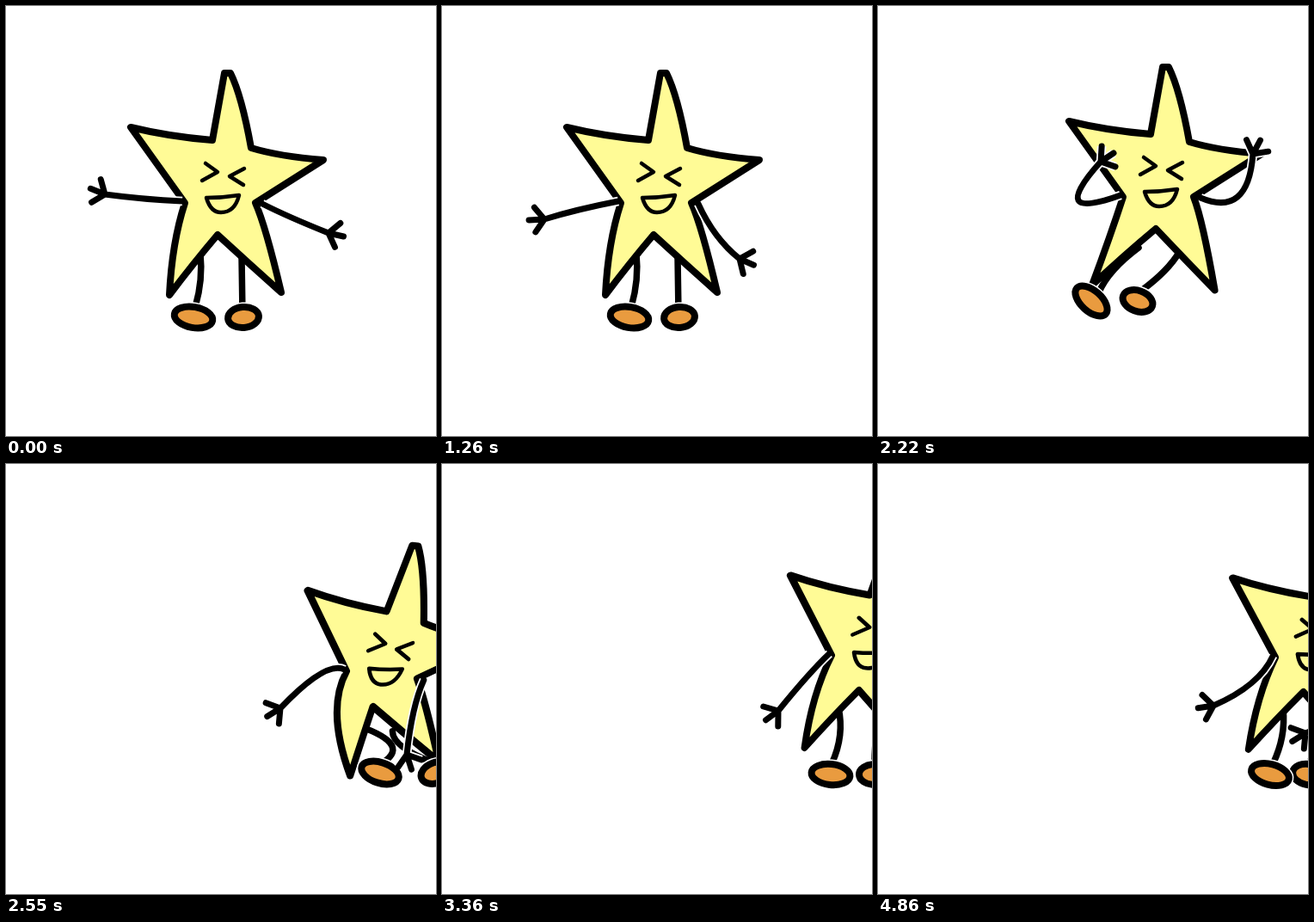
Write an HTML page with a canvas that moves like this. It is 500x500 px and loops after 4.89 s.

```html
<!DOCTYPE html>
<html>
<head>
<meta charset="utf-8">
<style>
html, body { margin: 0; overflow: hidden; background: #fff; }
canvas { display: block; }
</style>
</head>
<body>
<canvas id="stage" width="500" height="500"></canvas>
<script>
const ctx = document.getElementById('stage').getContext('2d');
const LOOP = 4890, STEP = 30;
const YELLOW = '#fffb96', ORANGE = '#e99b3f';
const easeIn = p => u => u ** p;
const easeOut = p => u => 1 - (1 - u) ** p;

// body: x, y, lean, stretch of the lower left tip
// left, right: elbow and wrist, relative to the body
// feet: left x and angle, right x and angle, shared y
// ease and hop describe the way to the next pose
const stand = {
  time: 0, ease: easeIn(8), hop: 0,
  body: [0, 0, 0, 0],
  left: [160, 224, 115, 219],
  right: [332, 246, 375, 264],
  feet: [218, 10, 276, -5, 362]
};
const drop = { ...stand, time: 1260, ease: easeIn(3),
  left: [159, 237, 119, 248], right: [319, 266, 346, 294] };
const crouch = {
  time: 1770, ease: easeIn(3), hop: 8,
  body: [-12, 8, -.05, 25],
  left: [180, 186, 165, 228],
  right: [337, 214, 325, 252],
  feet: [217, 38, 279, -12, 361]
};
const leap = {
  time: 2220, ease: easeIn(1), hop: -32,
  body: [77, -7, 0, -18],
  left: [156, 233, 182, 188],
  right: [341, 229, 359, 179],
  feet: [248, 42, 302, 20, 343]
};
const land = {
  time: 2550, ease: easeOut(3), hop: 0,
  body: [188, 16, -.2, 46],
  left: [176, 229, 131, 268],
  right: [286, 272, 278, 322],
  feet: [435, 18, 500, -20, 359]
};
const rest = { ...land, time: 3360, ease: easeIn(1),
  body: [245, -3, -.17, 5], left: [179, 251, 146, 290], feet: [452, 6, 503, 0, 361] };
const end = { ...rest, time: 4860,
  body: [254, -1, -.15, 3], left: [180, 256, 136, 282],
  right: [290, 280, 243, 314], feet: [456, 15, 500, 10, 361] };
const POSES = [stand, drop, crouch, leap, land, rest, end];

function poseAt(t) {
  const i = Math.max(1, POSES.findIndex(p => p.time >= t));
  const from = POSES[i - 1], to = POSES[i];
  const u = (t - from.time) / (to.time - from.time), k = from.ease(u);
  const mix = key => from[key].map((v, n) => v + (to[key][n] - v) * k);
  const hop = from.hop * Math.sin(Math.PI * u);
  const pose = { body: mix('body'), left: mix('left'), right: mix('right'), feet: mix('feet') };
  pose.body[1] += hop;
  pose.feet[4] += hop * .6;
  return pose;
}

function ink(path, width, fill, color = '#000') {
  if (fill) { ctx.fillStyle = fill; ctx.fill(path); }
  ctx.strokeStyle = color;
  ctx.lineWidth = width;
  ctx.stroke(path);
}

// Bent limb whose curve passes through the joint halfway
function limb([sx, sy], jx, jy, ex, ey) {
  const cx = 2 * jx - (sx + ex) / 2, cy = 2 * jy - (sy + ey) / 2;
  const path = new Path2D();
  path.moveTo(sx, sy);
  path.quadraticCurveTo(cx, cy, ex, ey);
  return { path, angle: Math.atan2(ey - cy, ex - cx) };
}

function drawArm(shoulder, [jx, jy, hx, hy], x, y, twist) {
  const wx = hx + x, wy = hy + y;
  const { path, angle } = limb(shoulder, jx + x, jy + y, wx, wy);
  for (const side of [-1, 0, 1]) {
    const a = angle + twist(angle) + side * .92;
    path.moveTo(wx, wy);
    path.lineTo(wx + 18 * Math.cos(a), wy + 18 * Math.sin(a));
  }
  ctx.lineCap = 'butt';
  ink(path, 10.5, null, '#fff');
  ctx.lineCap = 'round';
  ink(path, 7);
}

function drawLeg(hip, x, y, a, bulge) {
  const ax = x + 13 * Math.sin(a), ay = y - 13 * Math.cos(a);
  ink(limb(hip, (hip[0] + ax) / 2 + bulge, (hip[1] + ay) / 2, ax, ay).path, 7.5);
}

function drawFoot(x, y, a, rx) {
  const path = new Path2D();
  path.ellipse(x, y, rx, 12, a, 0, 7);
  ink(path, 11, null, '#fff');
  ink(path, 8, ORANGE);
}

function drawBody(x, y, a, b, s) {
  ctx.save();
  ctx.transform(1, b, a, 1, x - 229 * a, y - 246 * b);
  const star = new Path2D(`M254 78 L261 78 Q274 104 285 165 Q318 175 369 179 L290 229
    Q${302 + s * .08} 256 ${320 + s * .3} ${333 - s * .25}
    Q${283 + s * .15} ${300 - s * .12} 246 266
    Q${218 + s * .5} ${299 + s * .12} ${190 + s} ${336 + s * .25}
    Q193 275 208 229 L145 141 Q190 152 240 156 Z`);
  ink(star, 8, YELLOW);
  ink(new Path2D(`M232 183 L246 193 L228 203 M277 189 L260 198 L276 208
    M233 223 Q252 223 271 220 Q266 240 250 240 Q238 240 233 223 Z`), 4.5);
  ctx.restore();
}

function draw(t) {
  const { body, left, right, feet } = poseAt(t);
  const [x, y, lean, stretch] = body, tilt = -lean / 2;
  const onBody = (px, py) => [px + x + lean * (py - 229), py + y + tilt * (px - 246)];
  const [lx, la, rx, ra, fy] = feet, rad = Math.PI / 180;
  ctx.fillStyle = '#fff';
  ctx.fillRect(0, 0, 500, 500);
  ctx.lineCap = ctx.lineJoin = 'round';
  drawLeg(onBody(226, 288), lx, fy, la * rad, 3 + stretch / 2);
  drawLeg(onBody(274, 292), rx, fy, ra * rad, -stretch / 4);
  drawBody(x, y, lean, tilt, stretch);
  drawFoot(rx, fy, ra * rad, 18);
  drawFoot(lx, fy, la * rad, 22.5);
  drawArm(onBody(205, 227), left, x, y, () => .25);
  drawArm(onBody(298, 230), right, x, y, a => -.42 * Math.sin(a));
}

const start = performance.now();
function tick() {
  const t = (performance.now() - start) % LOOP;
  draw(Math.floor(t / STEP) * STEP);
  requestAnimationFrame(tick);
}
tick();
</script>
</body>
</html>
```
